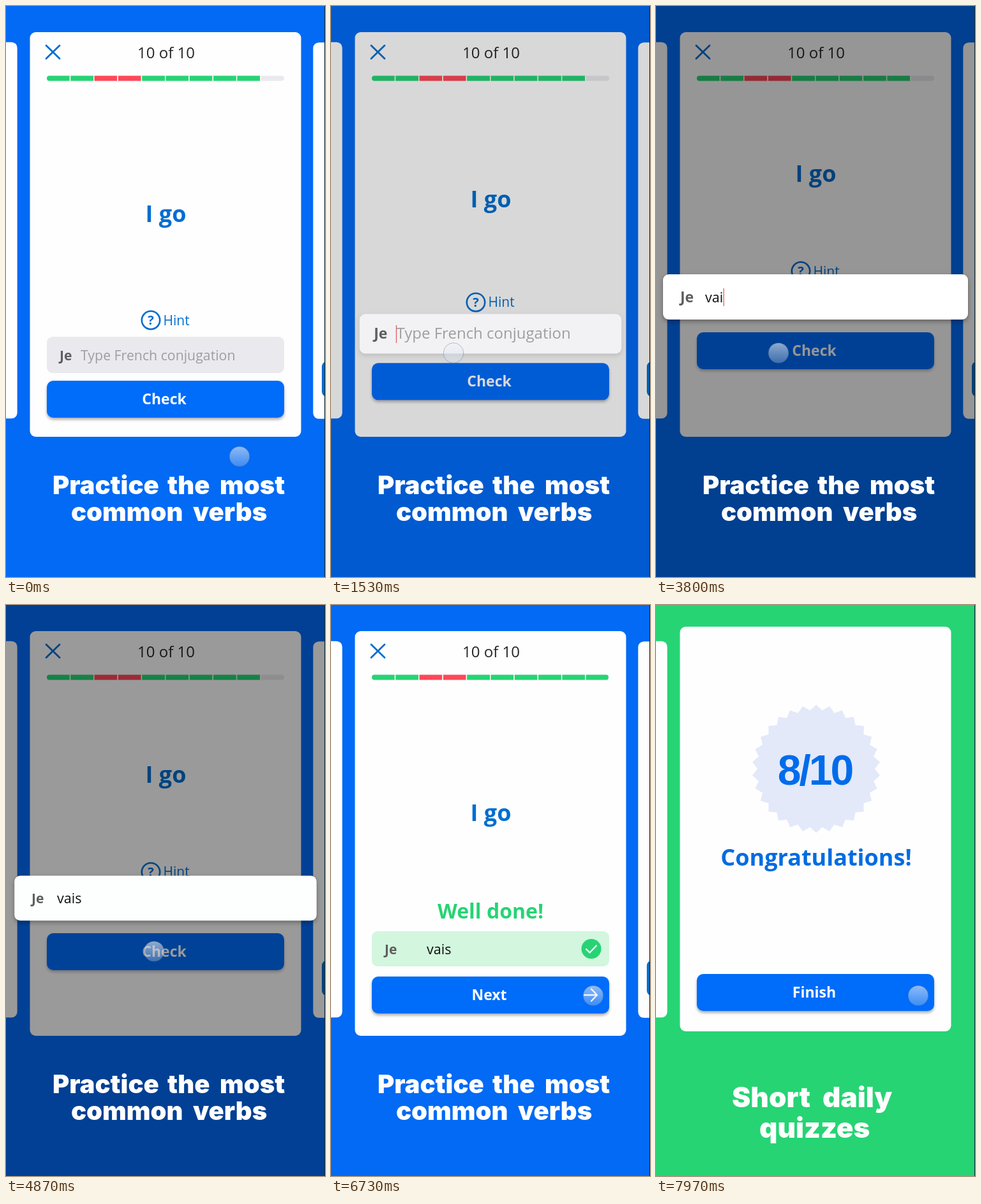
These frames come from a looping animation (500x896 px, 8 s). An HTML page with a canvas:

```html
<!DOCTYPE html>
<html lang="en">
<head>
<meta charset="utf-8">
<title>Verb practice</title>
<style>
  html, body { margin: 0; width: 100%; height: 100%; overflow: hidden; background: #0468f0; }
  canvas { display: block; width: 500px; height: 896px; }
</style>
</head>
<body>
<canvas id="stage"></canvas>
<script>
const W = 500, H = 896, LOOP = 8000;
const canvas = document.getElementById('stage');
const ctx = canvas.getContext('2d');
const ratio = window.devicePixelRatio || 1;
canvas.width = W * ratio;
canvas.height = H * ratio;

const BLUE = [2, 106, 244], GREEN = [38, 212, 116], RED = [255, 72, 88];
const PAPER = [254, 254, 254], FIELD = [234, 234, 238], MINT = [210, 246, 222];
const BUTTON = [0, 108, 250], LINK = [0, 110, 208], WHITE = [255, 255, 255];
const INK = [38, 38, 38], GREY = [94, 94, 97], PALE = [158, 158, 162];
const SANS = '"Open Sans", sans-serif', DISPLAY = 'Inter, sans-serif';

// Key moments in ms
const OPEN = 1275, CLOSE = 4790, NEXT = 6850, SLIDE = 950, TYPED = 2900, KEY_GAP = 350;

let dim = 0;

const lerp = (a, b, k) => a + (b - a) * k;
const mix = (a, b, k) => a.map((v, i) => lerp(v, b[i], k));
const ramp = (t, from, to) => Math.min(1, Math.max(0, (t - from) / (to - from)));
const easeInOut = k => k < .5 ? 2 * k * k : 1 - 2 * (1 - k) ** 2;
const easeOut = k => 1 - (1 - k) ** 2;
const shade = color => `rgb(${color.map(v => v * (1 - .41 * dim))})`;

function box(x, y, w, h, radius, color) {
  ctx.fillStyle = shade(color);
  ctx.beginPath();
  ctx.roundRect(x, y, w, h, radius);
  ctx.fill();
}

function text(str, x, y, font, color, align = 'left') {
  ctx.font = font;
  ctx.textAlign = align;
  ctx.fillStyle = shade(color);
  ctx.fillText(str, x, y);
}

function line(points, width, color) {
  ctx.strokeStyle = shade(color);
  ctx.lineWidth = width;
  ctx.beginPath();
  points.forEach(([x, y], i) => i ? ctx.lineTo(x, y) : ctx.moveTo(x, y));
  ctx.stroke();
}

function disc(x, y, r, color) {
  ctx.fillStyle = shade(color);
  ctx.beginPath();
  ctx.arc(x, y, r, 0, 7);
  ctx.fill();
}

function group(alpha, dx, draw) {
  if (alpha <= 0) return;
  ctx.save();
  ctx.globalAlpha *= alpha;
  ctx.translate(dx, 0);
  draw();
  ctx.restore();
}

function withShadow(color, blur, offset, draw) {
  ctx.save();
  ctx.shadowColor = color;
  ctx.shadowBlur = blur * ratio;
  ctx.shadowOffsetY = offset * ratio;
  draw();
  ctx.restore();
}

function card(cx, cy, scale) {
  const w = 425 * scale, h = 635 * scale;
  box(cx - w / 2, cy - h / 2, w, h, 9, PAPER);
}

function button(y, label) {
  withShadow('rgba(70,70,80,.45)', 4, 3, () => box(64, y, 372, 58, 10, BUTTON));
  text(label, 248, y + 37, `bold 23px ${SANS}`, WHITE, 'center');
}

function progressBar(t) {
  const step = 37.3;
  ctx.save();
  ctx.beginPath();
  ctx.roundRect(64, 109.5, 372, 8, 4);
  ctx.clip();
  box(64, 109, 372, 9, 0, FIELD);
  for (let i = 0; i < 9; i++) {
    box(64 + i * step, 109, step - 1.5, 9, 0, i === 2 || i === 3 ? RED : GREEN);
    box(64 + (i + 1) * step - 1.5, 109, 1.5, 9, 0, PAPER);
  }
  box(64 + 9 * step, 109, 35 * ramp(t, 5150, 5395), 9, [0, 4, 4, 0], GREEN);
  ctx.restore();
}

function question(t, open) {
  const answered = t >= CLOSE;
  const track = (before, opened, after) => lerp(answered ? after : before, opened, open);
  const result = ramp(t, 5050, 5340);

  line([[63, 62], [84, 82.5]], 2.8, LINK);
  line([[84, 62], [63, 82.5]], 2.8, LINK);
  text('10 of 10', 251, 81.5, `24px ${SANS}`, INK, 'center');
  progressBar(t);
  text('I go', 250.5, track(339, 276, 339), `bold 36px ${SANS}`, LINK, 'center');

  group(1 - ramp(t, 4950, 5150), 0, () => {
    const y = track(493, 416, 485);
    ctx.strokeStyle = shade(LINK);
    ctx.lineWidth = 2.6;
    ctx.beginPath();
    ctx.arc(227, y, 14.2, 0, 7);
    ctx.stroke();
    text('?', 227, y + 7, `bold 20px ${SANS}`, LINK, 'center');
    text('Hint', 246.5, y + 7.5, `21px ${SANS}`, LINK);
  });
  group(result, 0, () => text('Well done!', 250, 492, `bold 32px ${SANS}`, GREEN, 'center'));

  const buttonY = track(588, 512, 583);
  button(buttonY, t < 5080 ? 'Check' : 'Next');
  group(result, 0, () => {
    line([[397, buttonY + 29], [417, buttonY + 29]], 2.4, WHITE);
    line([[408, buttonY + 19.5], [417, buttonY + 29], [408, buttonY + 38.5]], 2.4, WHITE);
  });

  dim = 0;
  answerField(t, open, track, result);
}

function answerField(t, open, track, result) {
  const left = track(64, 11, 64), right = track(436, 489, 436);
  const top = track(519, 421, 512), bottom = track(576, 492, 567);
  const middle = (top + bottom) / 2, base = middle + 8;
  const focused = t >= OPEN && t < CLOSE;
  const resting = t >= CLOSE ? MINT : FIELD;

  withShadow(`rgba(0,0,0,${.35 * open})`, 7, 3, () =>
    box(left, top, right - left, bottom - top, 9, mix(resting, WHITE, open)));
  text('Je', track(84, 38, 84), base, `bold ${focused ? 23 : 21}px ${SANS}`, GREY);

  const x = track(117, 77, 150);
  const typed = 'vais'.slice(0, t < TYPED ? 0 : 1 + Math.floor((t - TYPED) / KEY_GAP));
  if (typed) text(typed, x, base, `21.5px ${SANS}`, [15, 15, 15]);
  else text('Type French conjugation', x, base, `${focused ? 24 : 21.3}px ${SANS}`, PALE);

  if (focused && t < 4500) {
    const caretX = x + (typed ? ctx.measureText(typed).width + 1 : 0);
    line([[caretX, middle - 13], [caretX, middle + 14]], 1.3, [222, 96, 90]);
  }
  group(result, 0, () => {
    disc(408, middle, 15.5, GREEN);
    line([[400, middle + .5], [405.5, middle + 6], [416, middle - 5]], 2.2, WHITE);
  });
}

function score(p) {
  const drop = (1 - p) * 22;
  ctx.fillStyle = shade([227, 233, 249]);
  ctx.beginPath();
  for (let i = 0; i < 60; i++) {
    const r = i % 2 ? 92 : 100.5, a = i * Math.PI / 30;
    ctx.lineTo(251 + r * Math.sin(a), 257 + drop - r * Math.cos(a));
  }
  ctx.fill();
  ctx.letterSpacing = '-3px';
  text('8/10', 249, 282 + drop, 'bold 66px "Liberation Sans", sans-serif', [0, 108, 235], 'center');
  ctx.letterSpacing = '0px';
  text('Congratulations!', 251, 409 + drop * .9, `bold 36px ${SANS}`, [0, 108, 225], 'center');
  button(579 + (1 - p) * 13, 'Finish');
}

function caption(words, size) {
  for (const [word, x, y] of words) text(word, x, y, `900 ${size}px ${DISPLAY}`, PAPER);
}

function cursor(t) {
  const stops = [[150, 1000, 192, 544.5], [4200, 4700, 232, 543.5], [5750, 6450, 411, 613]];
  let x = 366, y = 707;
  for (const [from, to, nx, ny] of stops) {
    const k = easeInOut(ramp(t, from, to));
    x = lerp(x, nx, k);
    y = lerp(y, ny, k);
  }
  const r = 15.8;
  const glass = ctx.createLinearGradient(0, y - r, 0, y + r);
  glass.addColorStop(0, 'rgba(240,242,245,.6)');
  glass.addColorStop(1, 'rgba(205,220,240,.3)');
  const overField = t > 5200 && t < 5900;
  ctx.fillStyle = overField ? 'rgba(250,250,250,.85)' : glass;
  ctx.strokeStyle = 'rgba(70,90,120,.35)';
  ctx.lineWidth = 1;
  ctx.beginPath();
  ctx.arc(x, y, r, 0, 7);
  ctx.fill();
  ctx.stroke();
  if (overField) {
    line([[x, y - 4], [x, y + 6]], 1, GREY);
    for (const end of [-4, 6]) line([[x - 3, y + end], [x + 3, y + end]], 1, GREY);
  }
}

function draw(t) {
  const open = t < CLOSE
    ? easeInOut(ramp(t, OPEN, OPEN + 600))
    : 1 - easeInOut(ramp(t, CLOSE, 5350));
  const slide = ramp(t, NEXT, NEXT + SLIDE);
  const enter = easeOut(slide), leave = enter ** .9;

  ctx.setTransform(ratio, 0, 0, ratio, 0, 0);
  dim = open;
  box(0, 0, W, H, 0, mix(BLUE, GREEN, slide ** 2));

  card(-180 - 430 * leave, 352, .93);
  card(250 - 430 * leave, lerp(358.5, 352, leave), lerp(1, .93, leave));
  card(lerp(679, 250, enter), lerp(352.5, 351.5, enter), lerp(.93, 1, enter));
  group(1 - ramp(slide, 0, .1), 0, () => box(495, 558, 20, 55, 8, LINK));

  group(ramp(slide, 0, .15), 429 * (1 - enter), () => score(enter));
  group(1 - ramp(slide, 0, .3), -430 * leave, () => question(t, open));
  dim = 0;

  group(slide < 1 ? 1 : 0, -444 * leave, () => caption([
    ['Practice', 73, 766], ['the', 253, 766], ['most', 335, 766],
    ['common', 102, 808], ['verbs', 293, 808]
  ], 40));
  group(ramp(slide, .5, .9), 0, () => caption([
    ['Short', 119, 788], ['daily', 261, 788], ['quizzes', 162, 836]
  ], 44));

  cursor(t);
  box(499, 0, 1, H, 0, [10, 40, 60]);
}

function tick(now) {
  draw(now % LOOP);
  requestAnimationFrame(tick);
}
ctx.lineCap = 'round';
ctx.lineJoin = 'round';
requestAnimationFrame(tick);
</script>
</body>
</html>
```
